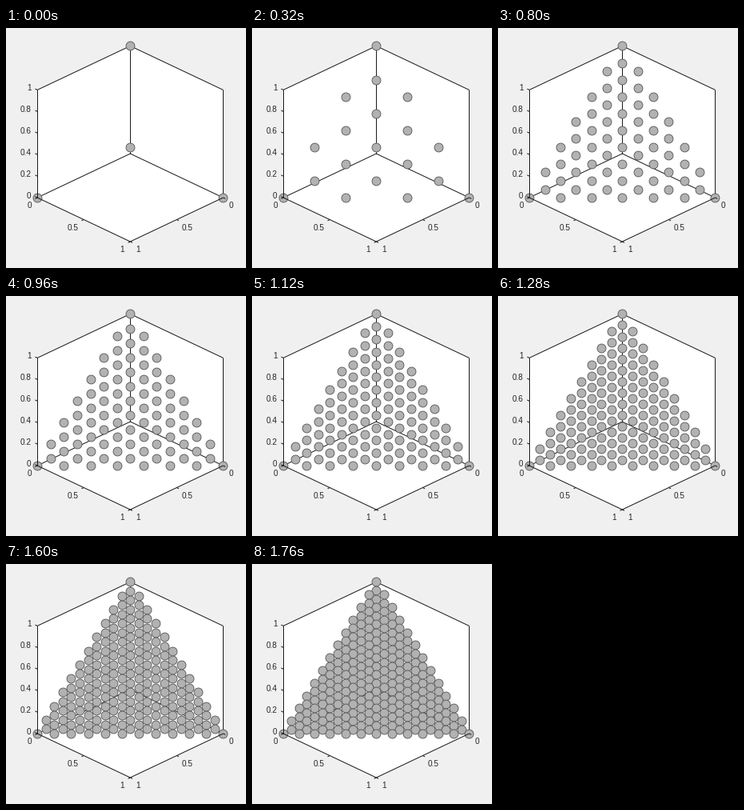
These frames come from a looping animation (300 by 300 pixels, 1920 ms). A matplotlib script:

```python
import numpy as np
import matplotlib.pyplot as plt
from matplotlib.animation import FuncAnimation

SIZE, DPI = 300, 100
FRAMES, INTERVAL = 12, 160
PX = 72 / DPI  # one pixel in points
INK = "#1a1a1a"

# Unit cube seen from 30 degrees above, stretched to fill the plot area
X0, X1 = 39.15, 271.45
Y0, Y1 = 22.45, 267
MID = (X0 + X1) / 2
ASPECT = np.sqrt(2) * np.tan(np.radians(30))  # floor height / wall height
WALL = (Y1 - Y0) / (1 + ASPECT)
HALF = (Y1 - Y0 - WALL) / 2

TOP = np.array([MID, Y0])
BACK = np.array([MID, Y0 + WALL])
FRONT = np.array([MID, Y1])
LEFT = np.array([X0, Y1 - HALF])
RIGHT = np.array([X1, Y1 - HALF])
LEFT_TOP = np.array([X0, Y0 + HALF])
RIGHT_TOP = np.array([X1, Y0 + HALF])

fig = plt.figure(figsize=(SIZE / DPI, SIZE / DPI), dpi=DPI, facecolor="#f0f0f0")
ax = fig.add_axes([0, 0, 1, 1])
ax.set_xlim(0, SIZE)
ax.set_ylim(SIZE, 0)
ax.axis("off")


def line(*points, zorder=2):
    x, y = np.array(points).T
    ax.plot(x, y, color=INK, lw=PX, zorder=zorder, solid_capstyle="butt")


def label(x, y, value, align):
    ax.text(x, y, f"{value:g}", ha=align, va="baseline", color="#262626",
            family="Liberation Sans", size=10 * PX, zorder=5)


def draw_axes():
    hexagon = [LEFT_TOP, TOP, RIGHT_TOP, RIGHT, FRONT, LEFT]
    ax.fill(*np.array(hexagon).T, color="white", lw=0, zorder=1)

    # Back edges lie behind the markers, rulers in front
    line(LEFT_TOP, TOP)
    line(TOP, RIGHT_TOP)
    line(RIGHT_TOP, RIGHT)
    line(LEFT, BACK, RIGHT)
    line(TOP, BACK)
    line(LEFT_TOP, LEFT, zorder=4)
    line(LEFT, FRONT, RIGHT, zorder=4)

    for v in np.linspace(0, 1, 6):
        p = LEFT + v * (LEFT_TOP - LEFT)
        line(p, p + (-2.7, -1.3), zorder=4)
        label(31.6, p[1] + 0.7, v, "right")

    for v in (0, 0.5, 1):
        p = LEFT + v * (FRONT - LEFT)
        line(p, p + (-2.7, 1.3), zorder=4)
        label(p[0] - 7, p[1] + 13.3, v, "right")
        p = RIGHT + v * (FRONT - RIGHT)
        line(p, p + (2.7, 1.3), zorder=4)
        label(p[0] + 6.7, p[1] + 13.3, v, "left")


def triangle_points(n):
    """Corners and centroids of a triangle split into n * n small ones."""
    points = []
    for row in range(n + 1):
        for col in range(row + 1):
            points.append((row, col))
            if row < n:
                points.append((row + 2 / 3, col + 1 / 3))
                if col < row:
                    points.append((row + 1 / 3, col + 2 / 3))
    row, col = np.array(sorted(points)).T[:, :, None] / n
    return TOP + row * (LEFT - TOP) + col * (RIGHT - LEFT)


draw_axes()
dots = ax.scatter([], [], s=(10.9 * PX) ** 2, facecolor="#b2b2b2",
                  edgecolor="#5a5a5a", linewidth=0.9 * PX, zorder=3)


def update(frame):
    dots.set_offsets(triangle_points(frame + 1))
    return (dots,)


anim = FuncAnimation(fig, update, frames=FRAMES, init_func=lambda: update(0),
                     interval=INTERVAL, repeat=True, repeat_delay=0)
plt.show()
```
